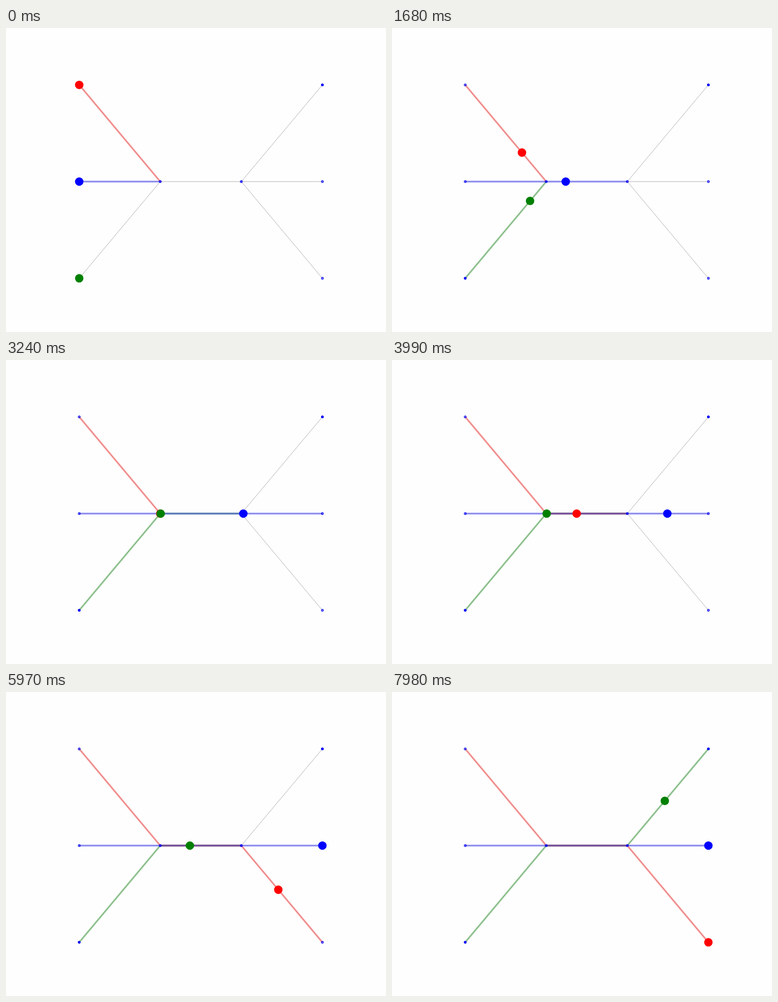
These frames come from a looping animation (837x669 px, 8 s). An HTML page with a canvas:

```html
<!DOCTYPE html>
<html>
<head>
<meta charset="utf-8">
<style>
  html, body { margin: 0; width: 100%; height: 100%; overflow: hidden; background: #fefefe; }
  canvas { display: block; }
</style>
</head>
<body>
<canvas id="stage" width="837" height="669"></canvas>
<script>
const ctx = document.getElementById('stage').getContext('2d');
const LOOP = 8000, STEP = 30;
const X = [161.3, 339.8, 518.3, 696.9], Y = [125.2, 338, 550.8];

const node = (col, row, alpha) => ({ x: X[col], y: Y[row], alpha });
const nodes = {
  topLeft: node(0, 0, 0.6), midLeft: node(0, 1, 0.6), lowLeft: node(0, 2, 0.95),
  west: node(1, 1, 0.7), east: node(2, 1, 0.7),
  topRight: node(3, 0, 0.95), midRight: node(3, 1, 0.6), lowRight: node(3, 2, 0.6)
};

const route = (from, to) => [nodes[from], nodes.west, nodes.east, nodes[to]];

// Keys are [time in ms, legs travelled]; flat stretches are waits at the junction.
const blue = {
  color: '#0000ff', route: route('midLeft', 'midRight'),
  keys: [[0, 0], [1200, 1], [3200, 2], [4800, 3]]
};
const red = {
  color: '#ff0000', route: route('topLeft', 'lowRight'),
  keys: [[0, 0], [2400, 1], [3240, 1], [5240, 2], [6840, 3]]
};
const green = {
  color: '#008000', route: route('lowLeft', 'topRight'),
  keys: [[400, 0], [2000, 1], [2010, 1.005], [5250, 1.005], [7240, 2], [8840, 3]]
};

function progressAt(keys, t) {
  if (t <= keys[0][0]) return keys[0][1];
  for (let i = 1; i < keys.length; i++) {
    const [t0, p0] = keys[i - 1], [t1, p1] = keys[i];
    if (t <= t1) return p0 + (p1 - p0) * (t - t0) / (t1 - t0);
  }
  return keys[keys.length - 1][1];
}

function line(a, b, color, width, alpha) {
  ctx.globalAlpha = alpha;
  ctx.strokeStyle = color;
  ctx.lineWidth = width;
  ctx.beginPath();
  ctx.moveTo(a.x, a.y);
  ctx.lineTo(b.x, b.y);
  ctx.stroke();
}

function dot(x, y, radius, color, alpha) {
  ctx.globalAlpha = alpha;
  ctx.fillStyle = color;
  ctx.beginPath();
  ctx.arc(x, y, radius, 0, 2 * Math.PI);
  ctx.fill();
}

function drawTracks() {
  const { west, east } = nodes;
  const tracks = [[west, east]];
  for (const n of Object.values(nodes)) {
    if (n.x === X[0]) tracks.push([n, west]);
    if (n.x === X[3]) tracks.push([n, east]);
  }
  for (const [a, b] of tracks) line(a, b, '#808080', 1, 0.7);
}

function drawTrail({ color, route, keys }, t) {
  const progress = progressAt(keys, t);
  for (let leg = 0; leg < 3; leg++) {
    const entered = progress > leg || (leg === 0 && t >= keys[0][0]);
    if (!entered) continue;
    line(route[leg], route[leg + 1], color, 5, 0.2);
    line(route[leg], route[leg + 1], color, 2.4, 0.25);
  }
}

function drawTrain({ color, route, keys }, t) {
  const progress = progressAt(keys, t);
  const leg = Math.min(2, Math.floor(progress)), part = progress - leg;
  const a = route[leg], b = route[leg + 1];
  dot(a.x + (b.x - a.x) * part, a.y + (b.y - a.y) * part, 9.3, color, 1);
}

function draw(t) {
  ctx.globalAlpha = 1;
  ctx.fillStyle = '#fefefe';
  ctx.fillRect(0, 0, 837, 669);
  drawTracks();
  for (const train of [green, red, blue]) drawTrail(train, t);
  for (const n of Object.values(nodes)) {
    dot(n.x, n.y, 3, '#0000ff', n.alpha);
    ctx.globalAlpha = 0.6;
    ctx.strokeStyle = '#0000e0';
    ctx.lineWidth = 1;
    ctx.beginPath();
    ctx.arc(n.x, n.y, 2.5, 0, 2 * Math.PI);
    ctx.stroke();
  }
  for (const train of [blue, red, green]) drawTrain(train, t);
}

let start;
function tick(now) {
  start ??= now;
  const t = (now - start + 1) % LOOP;
  draw(Math.floor(t / STEP) * STEP);
  requestAnimationFrame(tick);
}
draw(0);
requestAnimationFrame(tick);
</script>
</body>
</html>
```
